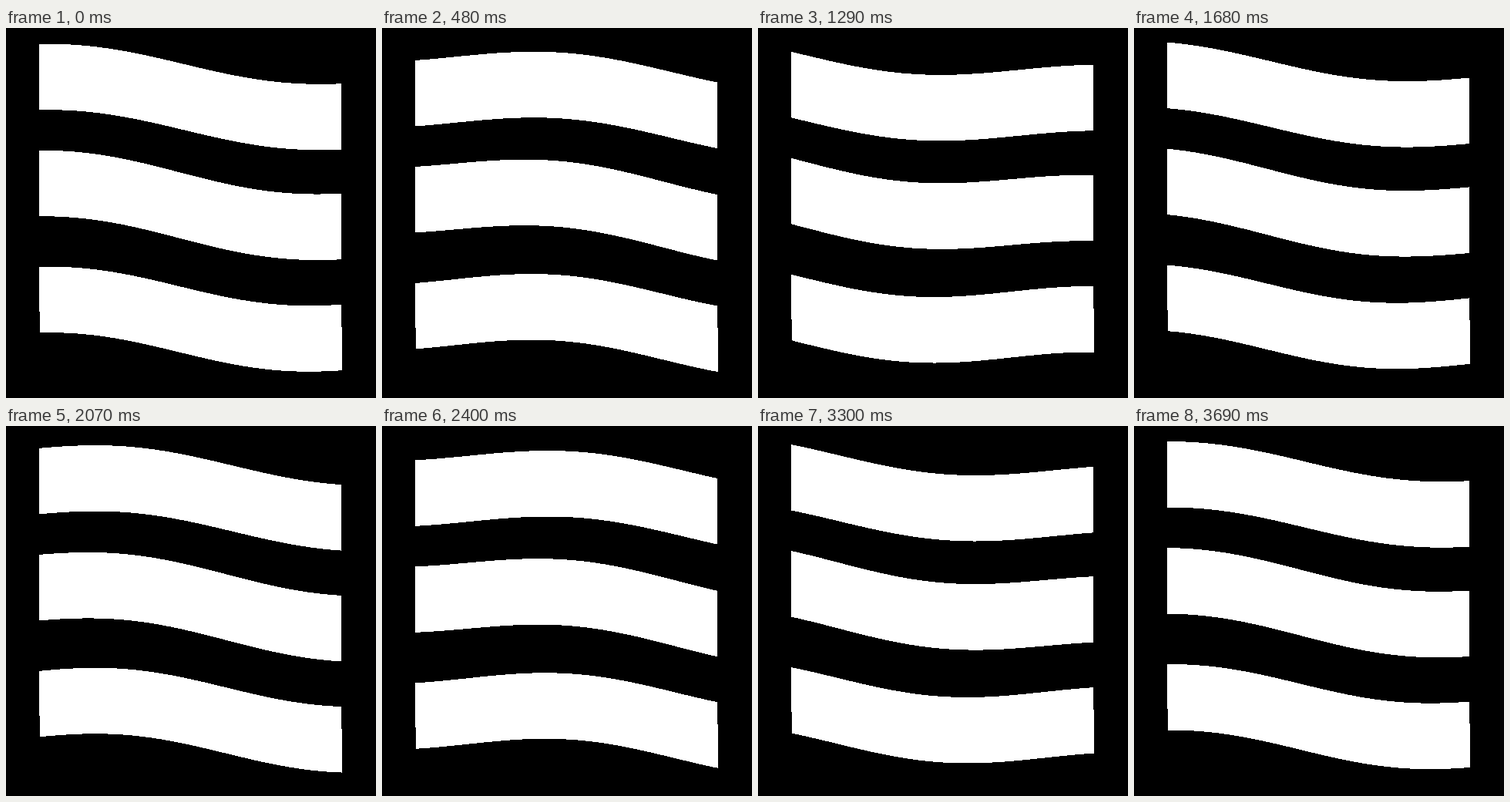
Write an HTML page that moves like this. It is 480 px wide and 480 px high and loops after 3720 ms.

```html
<!DOCTYPE html>
<html>
<head>
<meta charset="utf-8">
<style>
  html, body { margin: 0; height: 100%; overflow: hidden; background: #000; }
  svg { display: block; }
</style>
</head>
<body>
<svg id="stage" width="480" height="480" fill="#fff" shape-rendering="crispEdges"></svg>
<script>
const stage = document.getElementById('stage');
const LEFT = 43, WIDTH = 392, THICKNESS = 85.5, AMPLITUDE = 15;
const PERIOD = 1860, STEP = 30, START = 31;

// y: rest height at the left end, drop: fall to the right end,
// turn: degrees of wave across the width, skew: lean of the side edges
const stripes = [
  { y: 33.6, drop: 27.5, turn: 253, skew: 0 },
  { y: 171.6, drop: 33.5, turn: 261, skew: 0 },
  { y: 322.6, drop: 26.7, turn: 262, skew: 1.5 }
].map(stripe => {
  const path = document.createElementNS('http://www.w3.org/2000/svg', 'path');
  return { ...stripe, path: stage.appendChild(path) };
});

function drawStripe({ y, drop, turn, skew, path }, phase) {
  const top = [], bottom = [];
  for (let x = 0; x <= WIDTH; x += 4) {
    const u = x / WIDTH;
    const edge = y + drop * u - AMPLITUDE * Math.cos((phase - turn * u) * Math.PI / 180);
    const lean = x === 0 || x === WIDTH ? skew : 0;
    top.push([LEFT + x - (x ? 0 : skew / 3), edge]);
    bottom.unshift([LEFT + x + lean * (x ? 1 : 2 / 3), edge + THICKNESS]);
  }
  path.setAttribute('d', `M${[...top, ...bottom].join('L')}Z`);
}

function frame() {
  const time = Math.floor(performance.now() / STEP) * STEP;
  const phase = START + 360 * (time % PERIOD) / PERIOD;
  stripes.forEach(stripe => drawStripe(stripe, phase));
  requestAnimationFrame(frame);
}
frame();
</script>
</body>
</html>
```
